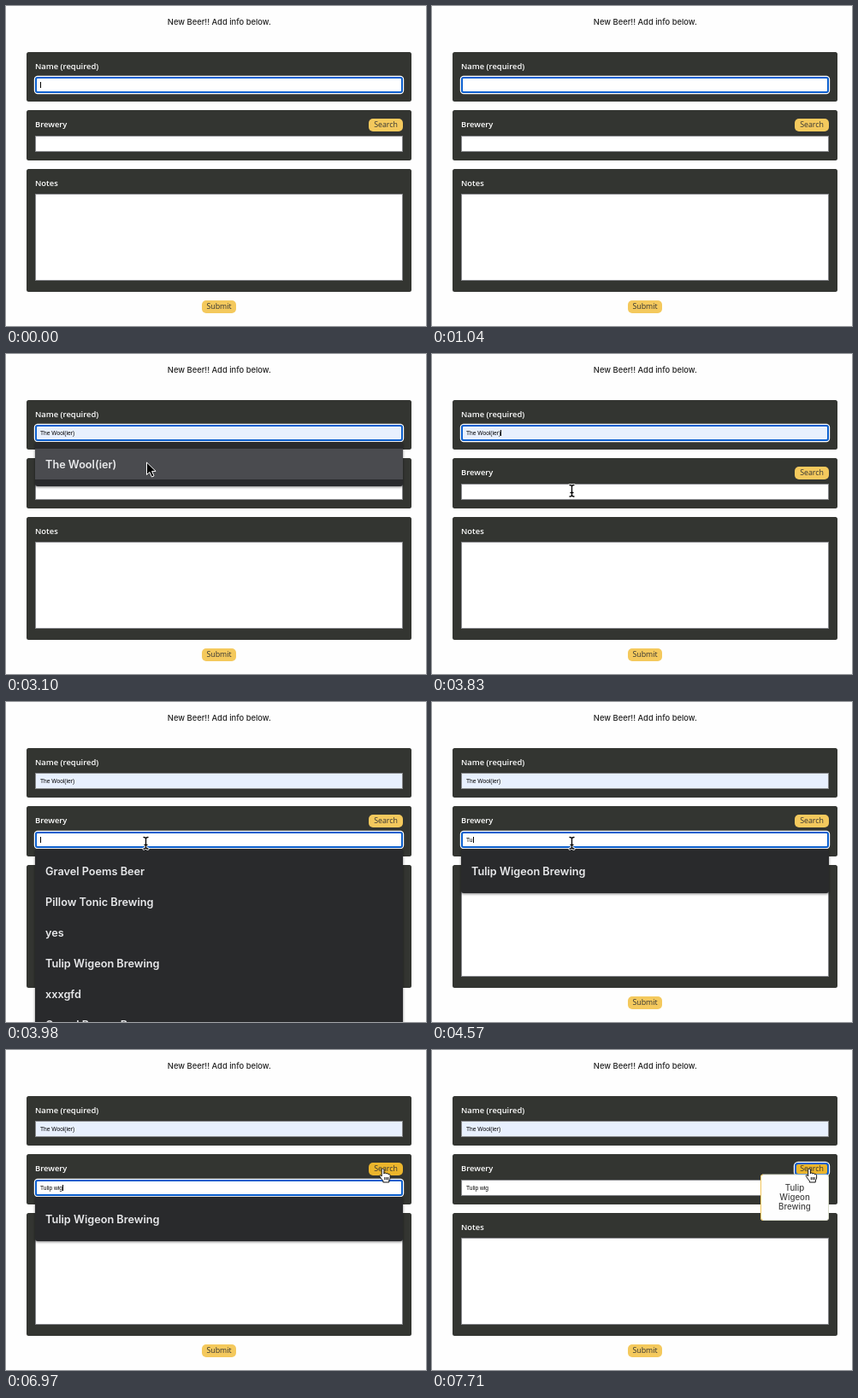
An HTML page for the animation above (8000 ms loop, 491 px wide and 375 px high).

```html
<!DOCTYPE html>
<html lang="en">
<head>
<meta charset="utf-8">
<title>New beer form</title>
<style>
  html, body { margin: 0; width: 100%; height: 100%; overflow: hidden; background: #fefefe; }
  svg { display: block; width: 491px; height: 375px; }
  .title { font: 500 9.4px Inter, sans-serif; fill: #222; text-anchor: middle; }
  .label { font: 600 9.4px "Open Sans", sans-serif; fill: #fff; }
  .btn { font: 500 8.8px "Open Sans", sans-serif; fill: #333; text-anchor: middle; }
  .typed { font: 6.67px "Liberation Sans", Arial, sans-serif; fill: #000; }
  .item { font: 600 12.7px Inter, sans-serif; fill: #e8e9eb; }
  .result { font: 500 9.7px Inter, sans-serif; fill: #444; text-anchor: middle; }
  .panel { fill: #333531; }
  .field { fill: #fff; stroke: #85868a; }
  .yellow { fill: #f4c95d; }
  .yellow.hover { fill: #ebb52c; }
  .field.filled { fill: #e8f0fe; }
  .menu rect { fill: #292a2c; }
  .menu .row { fill: none; }
  .menu.hot .row { fill: #4a4b4f; }
  .menu { filter: drop-shadow(0 1px 1.5px rgba(0, 0, 0, .5)); }
  .ring { fill: none; }
  .part { display: none; }
  .part.on { display: inline; }
</style>
</head>
<body>
<svg id="stage" viewBox="0 0 491 375">
  <text class="title" x="249.3" y="22">New Beer!! Add info below.</text>

  <rect class="panel" x="24" y="54" width="450" height="58" rx="2.5"/>
  <rect class="panel" x="24" y="122" width="450" height="59" rx="2.5"/>
  <rect class="panel" x="24" y="191" width="450" height="144" rx="2.5"/>
  <text class="label" x="34" y="74">Name (required)</text>
  <text class="label" x="34" y="142">Brewery</text>
  <text class="label" x="34" y="211">Notes</text>

  <rect class="field" id="nameField" x="34.5" y="83.5" width="429" height="18"/>
  <rect class="field" x="34.5" y="152.5" width="429" height="18"/>
  <rect class="field" x="34.5" y="220.5" width="429" height="101"/>

  <rect class="yellow" id="search" x="424" y="132" width="40" height="15" rx="5"/>
  <text class="btn" x="444" y="142.3">Search</text>
  <rect class="yellow" x="229" y="345" width="40" height="15" rx="5"/>
  <text class="btn" x="249" y="355.3">Submit</text>

  <g id="rings"></g>
  <text class="typed" id="name" x="40" y="95"></text>
  <text class="typed" id="brew" x="40" y="164"></text>
  <rect class="part" id="caret" width="1" height="7"/>
  <g id="menus"></g>

  <g class="part" id="popup">
    <rect x="384.5" y="146" width="79" height="53.5" rx="2.5" fill="#fefefe" stroke="#d9dccb"/>
    <path d="M387 199.5q-2.5 0-2.5-2.5V148.500q0-2.500 2.500-2.500" fill="none" stroke="#f2c65b"/>
    <text class="result" x="424" y="165">Tulip</text>
    <text class="result" x="424" y="176">Wigeon</text>
    <text class="result" x="424" y="187">Brewing</text>
  </g>

  <g id="cursor">
    <path class="part" id="arrow" d="M0 0V14.500L3.400 11.400L5.900 17L8.500 15.900L6.100 10.400H10.600Z"
      fill="#000" stroke="#fff" stroke-linejoin="round"/>
    <g class="part" id="beam" fill="none" stroke-linecap="round">
      <path id="beamLine" d="M-2.500-6.500Q0-6.500 0-4.500Q0-6.500 2.500-6.500M0-4.500V5M-2.500 7Q0 7 0 5Q0 7 2.500 7M-1.500 2.500H1.500"
        stroke="#fff" stroke-width="2.800"/>
      <use href="#beamLine"/>
      <path d="M-2.500-6.500Q0-6.500 0-4.500Q0-6.500 2.500-6.500M0-4.500V5M-2.500 7Q0 7 0 5Q0 7 2.500 7M-1.500 2.500H1.500"
        stroke="#000" stroke-width="1.300"/>
    </g>
    <path class="part" id="hand" d="M-1.300 1.200Q-1.300 0 0 0T1.400 1.300V6Q1.500 4.800 2.700 4.900T4 6.200Q4.200 5.300 5.300 5.500T6.500 6.900Q7 6.200 7.900 6.600T8.600 8.200V11Q8.300 12.600 7.300 14V16H.3V14.300Q-1.500 12.500-3.300 9.500Q-4.200 8-3.300 7.600T-1.300 8.900ZM2.300 10V13.300M4.300 10V13.300M6.200 10V13.300"
      fill="#fff" stroke="#111" stroke-width="1" stroke-linejoin="round"/>
  </g>
</svg>

<script>
const LOOP = 8000;
const BEER = 'The Wool(ier)';
const BREWERY = 'Tulip Wigeon Brewing';
const TYPED = 'Tulip wig';
const $ = id => document.getElementById(id);

function ring(id, x, y, w, h, r) {
  const box = (d, more) => `<rect x="${x + d}" y="${y + d}" width="${w - 2 * d}" height="${h - 2 * d}" ${more}/>`;
  $('rings').innerHTML += `<g class="part ring" id="${id}">` +
    box(-.5, `rx="${r + 1.5}" stroke="#fff" stroke-width="1.4"`) +
    box(1, `rx="${r}" stroke="#0b5fce" stroke-width="2"`) + '</g>';
}

function menu(id, y, items) {
  const rows = items.map((name, i) =>
    `<rect class="row" x="34" y="${y + 8 + 36 * i}" width="430" height="36"/>` +
    `<text class="item" x="46" y="${y + 30.7 + 36 * i}">${name}</text>`).join('');
  $('menus').innerHTML += `<g class="part menu" id="${id}">` +
    `<rect x="34" y="${y}" width="430" height="${16 + 36 * items.length}" rx="3"/>${rows}</g>`;
}

ring('nameRing', 34, 83, 430, 19, 2);
ring('brewRing', 34, 152, 430, 19, 2);
ring('searchRing', 424, 132, 40, 15, 3);
menu('beers', 103, [BEER]);
menu('all', 172, ['Gravel Poems Beer', 'Pillow Tonic Brewing', 'yes', BREWERY, 'xxxgfd', 'Gravel Poems Beer']);
menu('match', 172, [BREWERY]);

const brew = n => ({ brew: TYPED.slice(0, n), caret: 1 });
const move = (cursor, x, y) => ({ cursor, x, y });

// Each cue changes part of the state and holds until the next.
const cues = [
  [0, { name: '', brew: '', focus: 'name', caret: 1, menu: '', cursor: '', x: 0, y: 0 }],
  [150, { caret: 0 }],
  [590, { caret: 1 }],
  [1040, { caret: 0 }],
  [1340, { name: 'T', caret: 1, menu: 'beers' }],
  [1480, { name: 'Th' }],
  [1630, { name: 'The' }],
  [2230, { caret: 0 }],
  [2370, move('beam', 178, 285)],
  [2520, move('arrow', 172, 205)],
  [2670, move('arrow', 167, 152)],
  [2810, { ...move('arrow', 165, 136), name: BEER, hot: 1, filled: 1 }],
  [2960, move('arrow', 165, 130)],
  [3100, move('arrow', 164.5, 127)],
  [3400, { menu: '', hot: 0, caret: 1 }],
  [3550, move('arrow', 164, 141)],
  [3690, move('beam', 163.5, 160)],
  [3840, { ...move('beam', 163.5, 165), focus: 'brew' }],
  [3980, { menu: 'all' }],
  [4430, { ...brew(1), menu: 'match' }],
  [4570, brew(2)],
  [4720, brew(3)],
  [4870, brew(4)],
  [5020, brew(5)],
  [5170, brew(7)],
  [5320, brew(8)],
  [5620, brew(9)],
  [6070, { caret: 0 }],
  [6220, move('beam', 190, 164)],
  [6370, move('beam', 275, 160)],
  [6520, { ...move('arrow', 370, 147), caret: 1 }],
  [6670, { ...move('hand', 428, 138), hover: 1 }],
  [6820, move('hand', 438, 138.5)],
  [6970, move('hand', 440.5, 139)],
  [7120, { focus: 'search', caret: 0, menu: '' }],
  [7260, move('hand', 441, 139)],
  [7560, { popup: 1 }]
];

const show = (id, on) => $(id).classList.toggle('on', !!on);

function render(s) {
  $('name').textContent = s.name;
  $('brew').textContent = s.brew;
  $('nameField').classList.toggle('filled', !!s.filled);
  $('search').classList.toggle('hover', !!s.hover);
  $('beers').classList.toggle('hot', !!s.hot);
  for (const f of ['name', 'brew', 'search']) show(f + 'Ring', s.focus === f);
  for (const m of ['beers', 'all', 'match']) show(m, s.menu === m);
  for (const c of ['arrow', 'beam', 'hand']) show(c, s.cursor === c);
  show('popup', s.popup);
  show('caret', s.caret);
  $('cursor').setAttribute('transform', `translate(${s.x} ${s.y})`);
  if (s.caret) {
    const text = s.focus === 'name' ? 'name' : 'brew';
    $('caret').setAttribute('x', 40 + Math.round($(text).getComputedTextLength()));
    $('caret').setAttribute('y', text === 'name' ? 89 : 158);
  }
}

let shown = -1;
const start = performance.now();

function tick() {
  const t = (performance.now() - start) % LOOP;
  const past = cues.filter(c => c[0] <= t);
  if (past.length !== shown) {
    shown = past.length;
    render(Object.assign({}, ...past.map(c => c[1])));
  }
  requestAnimationFrame(tick);
}
tick();
</script>
</body>
</html>
```
